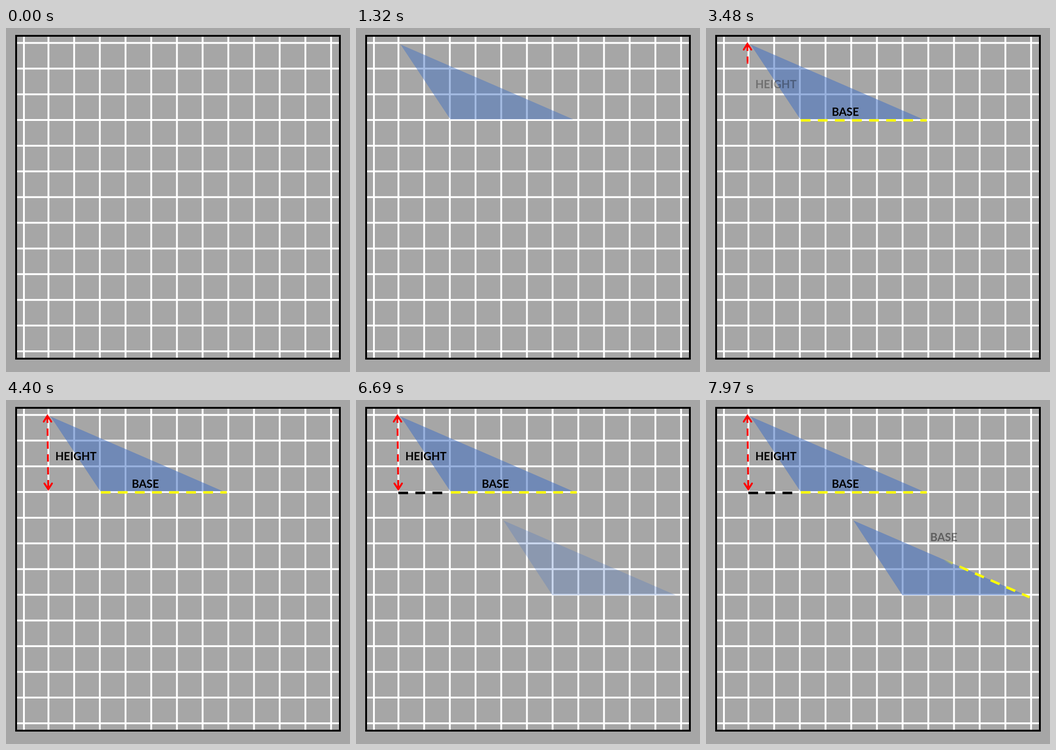
These frames come from a looping animation (748 px wide and 748 px high, 8 s). An HTML page:

```html
<!DOCTYPE html>
<html lang="en">
<head>
<meta charset="utf-8">
<title>Base and height of a triangle</title>
<style>
  html, body { margin: 0; width: 100%; height: 100%; overflow: hidden; background: #a6a6a6; }
  svg { display: block; width: 100vw; height: 100vh; }
  text { font: 700 24px Lato, "Open Sans", sans-serif; text-anchor: middle; }
</style>
</head>
<body>
<svg viewBox="0 0 748 748">
  <defs id="defs"></defs>
  <rect width="748" height="748" fill="#a6a6a6"/>
  <path id="grid" stroke="#fff" stroke-width="4"/>
  <rect x="22" y="17" width="704" height="702" fill="none" stroke="#000" stroke-width="4"/>
  <g id="scene" fill="none"></g>
</svg>
<script>
const LOOP = 8000;
const FEATHER = 0.115; // soft edge of a wipe, relative to its span
const STEP = 55.87;
const NS = 'http://www.w3.org/2000/svg';
const scene = document.getElementById('scene');
const defs = document.getElementById('defs');
const updates = [];

function add(parent, tag, attrs, text) {
  const el = document.createElementNS(NS, tag);
  for (const key in attrs) el.setAttribute(key, attrs[key]);
  if (text) el.textContent = text;
  parent.appendChild(el);
  return el;
}

function animate(start, duration, apply) {
  updates.push(t => apply(Math.min(1, Math.max(0, (t - start) / duration))));
}

function fade(el, start, duration, opacity = 1) {
  animate(start, duration, p => el.setAttribute('opacity', p * opacity));
}

function triangle(points, start) {
  fade(add(scene, 'polygon', { points, fill: '#4472c4' }), start, 1400, 0.55);
}

function label(text, x, y, start, duration) {
  fade(add(scene, 'text', { x, y, fill: '#000' }, text), start, duration);
}

// Returns a paint that reveals a shape along one axis behind a soft edge.
function wipePaint(color, axis, from, to, start, duration) {
  const id = 'wipe' + defs.childNodes.length;
  const gradient = add(defs, 'linearGradient', {
    id, gradientUnits: 'userSpaceOnUse', x1: 0, y1: 0, x2: 0, y2: 0
  });
  add(gradient, 'stop', { offset: 0, 'stop-color': color });
  add(gradient, 'stop', { offset: 1, 'stop-color': color, 'stop-opacity': 0 });
  const soft = (to - from) * FEATHER;
  animate(start, duration, p => {
    const front = from + (to - from + soft) * p;
    gradient.setAttribute(axis + 1, front - soft);
    gradient.setAttribute(axis + 2, front);
  });
  return `url(#${id})`;
}

function dashed(d, width, stroke) {
  add(scene, 'path', {
    d, stroke, 'stroke-width': width, 'stroke-dasharray': `${width * 4} ${width * 3}`
  });
}

let lines = 'M39 17V719';
for (let i = 0; i < 13; i++) {
  if (i < 12) lines += `M${92.3 + i * STEP} 17V719`;
  lines += `M22 ${32.5 + i * STEP}H726`;
}
document.getElementById('grid').setAttribute('d', lines);

triangle('97,36 205,198.5 472,198.5', 90);
triangle('320.5,262 427,424.5 695.5,424.5', 5980);

dashed('M206 200.8H480', 5.307, wipePaint('#ff0', 'x', 206, 480, 1500, 1390));
label('BASE', 303, 191, 1500, 1390);

const red = wipePaint('#f00', 'y', 31, 197, 3040, 1380);
dashed('M90 34L92 194', 4, red);
add(scene, 'path', {
  d: 'M82 47L90 34.5L98.5 47M83.5 181.5L92 194L100 181.5',
  stroke: red, 'stroke-width': 4, 'stroke-linecap': 'round'
});
label('HEIGHT', 152, 131, 3040, 1380);

dashed('M92 202H203', 5.307, wipePaint('#000', 'x', 204, 92, 4440, 1450));

dashed('M312.7 257.7L703.5 428.9', 5.307, wipePaint('#ff0', 'x', 704, 313, 7380, 1380));
label('BASE', 517, 307, 7380, 1380);

function render(t) {
  for (const update of updates) update(t);
}

const origin = performance.now();
function tick() {
  render((performance.now() - origin) % LOOP);
  requestAnimationFrame(tick);
}
tick();
</script>
</body>
</html>
```
